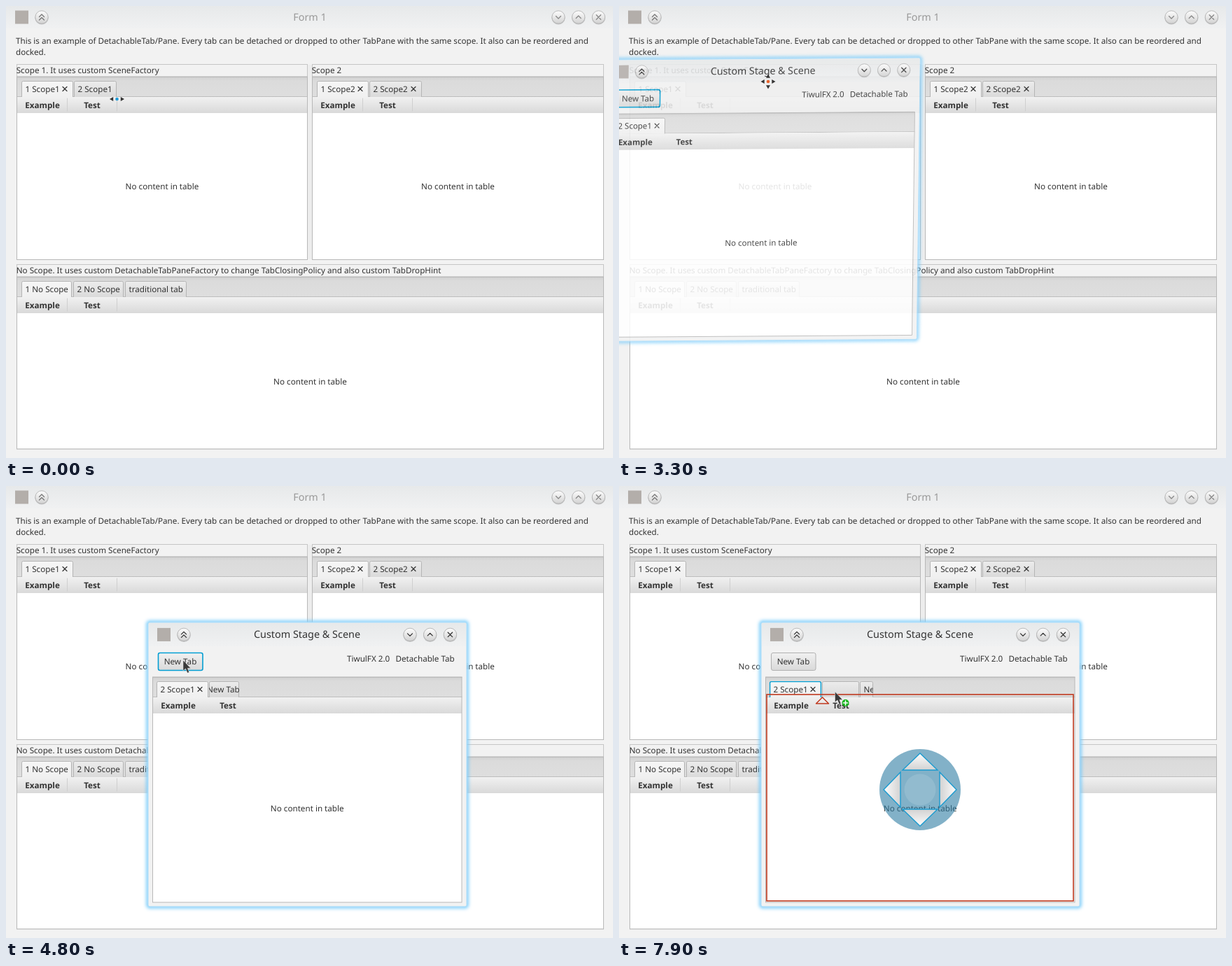
An HTML page for the animation above (8 s loop, 867 by 646 pixels).

```html
<!DOCTYPE html>
<html lang="en">
<head>
<meta charset="utf-8">
<title>Detachable tabs</title>
<style>
html, body { margin: 0; width: 100%; height: 100%; overflow: hidden; background: #f2f2f2; }
svg { display: block; }
text {
  font: 11.67px "Noto Sans", sans-serif;
  fill: #333;
  text-rendering: geometricPrecision;
  white-space: pre;
}
.mid { text-anchor: middle; }
.bold { font-weight: 700; }
.title { font-size: 14.4px; text-anchor: middle; }
.tiny { font-size: 5.8px; fill: #666; }
.line { fill: none; stroke-linecap: round; stroke-linejoin: round; }
</style>
</head>
<body>
<svg id="stage" width="867" height="646" viewBox="0 0 867 646">
  <defs>
    <linearGradient id="bar" x2="0" y2="1"><stop stop-color="#e7e9ea"/><stop offset="1" stop-color="#f0f1f2"/></linearGradient>
    <linearGradient id="strip" x2="0" y2="1"><stop stop-color="#d0d0d0"/><stop offset=".2" stop-color="#dbdbdb"/><stop offset="1" stop-color="#dedede"/></linearGradient>
    <linearGradient id="head" x2="0" y2="1"><stop stop-color="#f1f1f1"/><stop offset="1" stop-color="#d9d9d9"/></linearGradient>
    <linearGradient id="tab" x2="0" y2="1"><stop stop-color="#ececec"/><stop offset="1" stop-color="#dadada"/></linearGradient>
    <linearGradient id="tabOn" x2="0" y2="1"><stop stop-color="#f6f6f6"/><stop offset="1" stop-color="#f0f0f0"/></linearGradient>
    <linearGradient id="knob" x2="0" y2="1"><stop stop-color="#fdfdfd"/><stop offset="1" stop-color="#d2d2d2"/></linearGradient>
    <filter id="blur" x="-10%" y="-10%" width="120%" height="120%"><feGaussianBlur stdDeviation="2.6"/></filter>
  </defs>
  <g id="view"></g>
</svg>
<script>
const LOOP = 8000, BLUE = '#039ed3', RED = '#c03a20';
const EMPTY = 'No content in table';

const text = (x, y, s, cls = '', extra = '') => `<text x="${x}" y="${y}" class="${cls}" ${extra}>${s}</text>`;
const rect = (x, y, w, h, fill, extra = '') => `<rect x="${x}" y="${y}" width="${w}" height="${h}" fill="${fill}" ${extra}/>`;
const path = (d, stroke, w = 1, extra = '') => `<path class="line" d="${d}" stroke="${stroke}" stroke-width="${w}" ${extra}/>`;
const at = (x, y, s) => `<g transform="translate(${x} ${y})">${s}</g>`;
const cross = (x, y, r, color, w) => path(`M${x - r} ${y - r}l${2 * r} ${2 * r}m0 ${-2 * r}l${-2 * r} ${2 * r}`, color, w);

const GLYPHS = {
  roll: 'M-3.5 -.5L0 -4L3.5 -.5M-3.5 4L0 .5L3.5 4',
  down: 'M-3.5 -1.5L0 2L3.5 -1.5',
  up: 'M-3.5 1.5L0 -2L3.5 1.5',
  close: 'M-3.2 -3.2L3.2 3.2M3.2 -3.2L-3.2 3.2'
};

function knob(x, y, glyph, color) {
  return at(x, y,
    '<circle cy="1" r="9.6" fill="#000" opacity=".17"/>' +
    '<circle r="9.2" fill="url(#knob)" stroke="#acacac" stroke-width=".8"/>' +
    path(GLYPHS[glyph], color, 1.3));
}

function titleBar(iconX, y, mid, title, right, active) {
  const color = active ? '#333' : '#999';
  return rect(iconX, y - 9.5, 19, 19, '#b3aeaa') +
    knob(iconX + 38, y, 'roll', active ? '#333' : '#777') +
    text(mid, y + 5, title, 'title', `style="fill:${color}"`) +
    ['down', 'up', 'close'].map((g, i) => knob(right + i * 28.7, y, g, active ? '#333' : '#888')).join('');
}

// flags: s selected, x closable, f focused, h hovered
function tab(y, [x, w, label, flags, shift = 5.5]) {
  const has = f => flags.includes(f);
  const shape = (i, h) => `M${x + i} ${y + h}V${y + i + 2}q0 -2 2 -2H${x + w - i - 2}q2 0 2 2V${y + h}`;
  let out = `<path d="${shape(.5, 23)}" fill="url(#${has('s') || has('h') ? 'tabOn' : 'tab'})" stroke="#b4b4b4"/>`;
  if (has('f')) out += path(shape(.6, 22.5), BLUE, 1.4);
  out += `<svg x="${x}" y="${y}" width="${w}" height="23">${text(shift, 15.7, label)}</svg>`;
  if (has('x')) out += cross(x + w - 12, y + 11.5, 3, '#333', 1.2);
  return out;
}

function tableHead(x, y, w, lines) {
  return rect(x, y, w, 23, 'url(#head)') +
    text(x + 36.5, y + 16.2, 'Example', 'mid bold') +
    text(x + 107.5, y + 16.2, 'Test', 'mid bold') +
    (lines ? path(`M${x + 72} ${y + 2}v18m71 -18v18`, '#cfcfcf') : '');
}

function tabPane(x, y, w, h, tabs, page, lines) {
  const top = y + 29;
  const body = page ?
    rect(x, top, w, h - 29, '#f3f3f3') + text(x + .5, top + 13, page) :
    rect(x, top, w, h - 29, '#fff') + tableHead(x, top, w, lines) +
      text(x + w / 2, (top + 23 + y + h) / 2 + 4.5, EMPTY, 'mid');
  return rect(x, y, w, 29, 'url(#strip)') +
    path(`M${x} ${y + .5}h${w}M${x} ${top - .5}h${w}`, '#bdbdbd') +
    body + rect(x, y, w, h, 'none', 'stroke="#b8b8b8"') +
    tabs.map(t => tab(top - 23, t)).join('');
}

function group(x, y, w, h, label, tabs) {
  return rect(x, y, w, h, '#f2f2f2', 'stroke="#c6c6c6"') +
    text(x - .8, y + 12.6, label) +
    tabPane(x, y + 17.5, w, h - 17.5, tabs, '', true);
}

function mainWindow(s) {
  return rect(0, 0, 867, 646, '#f2f2f2') + rect(0, 0, 867, 32, 'url(#bar)') +
    titleBar(13, 16, 434, 'Form 1', 789, s.active) +
    text(14, 54, 'This is an example of DetachableTab/Pane. Every tab can be detached or dropped to other TabPane with the same scope. It also can be reordered and') +
    text(14, 70, 'docked.') +
    rect(431, 84, 6, 278, '#ededed') +
    group(15.5, 83.5, 415, 279, 'Scope 1. It uses custom SceneFactory', s.left) +
    group(437.5, 83.5, 416, 279, 'Scope 2', [[444, 74, '1 Scope2', 'sx'], [519, 75, '2 Scope2', 'x']]) +
    group(15.5, 369.5, 838, 263.5, 'No Scope. It uses custom DetachableTabPaneFactory to change TabClosingPolicy and also custom TabDropHint',
      [[22, 72, '1 No Scope', 's'], [96, 72, '2 No Scope', ''], [170, 88, 'traditional tab', '']]);
}

function dock(x) {
  const arrow = [0, 90, 180, 270].map(a =>
    `<path d="M0 -52L25 -28H-25Z" transform="rotate(${a})" fill="url(#knob)" stroke="#1a9bd0" stroke-width="1.4"/>`).join('');
  return rect(211, 298, 438, 295, 'none', `stroke="${RED}" stroke-width="1.6"`) +
    path(`M${x} 302l9 9h-18z`, RED, 1.5) +
    at(430, 434, '<circle r="58" fill="#2f7da3" opacity=".6"/>' + arrow +
      '<circle r="22.5" fill="#fff" opacity=".13"/>');
}

function childWindow(s) {
  const frame = 'x="203" y="195" width="455" height="406" rx="2"';
  const button = s.button === 'pressed' ? '#d4d4d4' : 'url(#head)';
  const edge = s.button ? `stroke="${BLUE}" stroke-width="1.6"` : 'stroke="#b0b0b0"';
  return `<g transform="${s.move}" opacity="${s.fade}">
    <rect ${frame} fill="#fff" stroke="#6cc8fa" stroke-width="5" filter="url(#blur)"/>
    <rect ${frame} fill="#f2f2f2" stroke="#a9dcf8"/>` +
    rect(204, 196, 453, 33, 'url(#bar)') +
    titleBar(216, 212.4, 430, 'Custom Stage &amp; Scene', 577, true) +
    rect(217.5, 238.5, 63.5, 25, button, `rx="2.5" ${edge}`) +
    text(249, 255.3, 'New Tab', 'mid') +
    text(487, 251, 'TiwulFX 2.0') + text(556.5, 251, 'Detachable Tab') +
    tabPane(209.5, 273, 441.5, 322, s.tabs, s.page) +
    (s.dock ? dock(s.dock) : '') + '</g>';
}

const spikes = angles => angles.map(a => `<path d="M0 -10.5L3 -5.3H-3Z" transform="rotate(${a})" fill="#333"/>`).join('');
const dot = color => `<circle r="2.3" fill="${color}"/>`;
const CURSORS = {
  cols: spikes([90, 270]) + dot('#1d9bd8'),
  rows: spikes([0, 180]) + dot('#1d9bd8'),
  move: spikes([0, 90, 180, 270]) + dot('#e8622a'),
  arrow: '<path d="M0 0V15L3.5 12L6.2 18.2L8.6 17.2L6.4 11.4H10.8Z" fill="#3a3a3a" stroke="#eee" stroke-width=".5"/>'
};
const PLUS = '<circle cx="15" cy="16" r="5" fill="#12b51a"/>' + path('M12 16h6m-3 -3v6', '#fff', 1.6);

function cursor([kind, x, y, drag, plus]) {
  const chip = drag ? rect(11.5, .5, 40, 12, '#eee', 'stroke="#bbc6cc" opacity=".85"') +
    text(14, 8.6, drag + ' ×', 'tiny') : '';
  return at(x, y, chip + CURSORS[kind] + (plus ? PLUS : ''));
}

const scope1 = flags => ['2 Scope1', flags];
const one = f => [22, 74, '1 Scope1', f];
const pick = [215, 74, ...scope1('sx')], rest = [215, 61, ...scope1('')];
const new1 = [290, 69, 'New Tab 1', ''];
const shift = (x, y) => `translate(${x} ${y})`;
const drag = (x, y) => ['arrow', x, y, '2 Scope1'];

// each step changes only what it names
const STEPS = [
  [0, { cursor: ['cols', 158.5, 133], active: false, fade: 0, page: '', dock: 0, button: 'focus', tabs: [pick],
        left: [one('sx'), [97, 61, ...scope1('')]] }],
  [700, { cursor: ['arrow', 150, 125], left: [one('sx'), [97, 61, ...scope1('h')]] }],
  [800, { cursor: ['arrow', 144, 125] }],
  [900, { cursor: ['arrow', 140, 125] }],
  [1100, { cursor: ['arrow', 137, 122] }],
  [1200, { cursor: ['arrow', 134, 120] }],
  [1300, { cursor: ['arrow', 132, 119] }],
  [1700, { active: true, left: [[22, 61, '1 Scope1', ''], [84, 74, ...scope1('sxf')]] }],
  [1800, { cursor: drag(134, 113), left: [one('sxf')] }],
  [1900, { cursor: drag(138, 102) }],
  [2000, { cursor: drag(143, 88) }],
  [2100, { cursor: drag(147, 76) }],
  [2200, { cursor: drag(149, 69) }],
  [2400, { cursor: ['rows', 150.5, 72] }],
  [2600, { cursor: ['arrow', 150, 72], active: false, fade: .6, move: shift(-230, -116), left: [one('sx')] }],
  [3100, { cursor: ['arrow', 172, 94], fade: 1, move: shift(-230, -118) }],
  [3300, { cursor: ['move', 213, 108], fade: .87, move: 'matrix(.984 -.0066 -.012 .991 -214.9 -114.9)' }],
  [3400, { cursor: ['move', 285, 146], move: shift(-160, -82) }],
  [3500, { cursor: ['move', 345, 179], move: shift(-86, -48) }],
  [3600, { cursor: ['move', 384, 200], move: shift(-31, -24) }],
  [3800, { cursor: ['move', 402, 210], move: shift(-8, -6) }],
  [3900, { cursor: ['move', 404, 212], move: shift(1.5, 1.5) }],
  [4000, { move: shift(2, 1.5) }],
  [4200, { cursor: ['arrow', 330, 235], fade: .95, move: shift(1, .5) }],
  [4300, { cursor: ['arrow', 277, 251], fade: 1, move: shift(0, 0) }],
  [4500, { cursor: ['arrow', 253, 249] }],
  [4700, { button: 'pressed' }],
  [4800, { button: 'focus', tabs: [pick, [290, 43, 'New Tab 1', '', -3]] }],
  [5000, { tabs: [pick, new1] }],
  [5300, { button: 'pressed', tabs: [pick, new1, [360, 35, 'New Tab 2', '', -6]] }],
  [5400, { button: 'focus', tabs: [pick, new1, [360, 70, 'New Tab 2', '']] }],
  [5600, { cursor: ['arrow', 334, 276] }],
  [5800, { cursor: ['arrow', 370, 285] }],
  [5900, { cursor: ['arrow', 400, 290] }],
  [6300, { button: '', page: 'Content New Tab 2',
           tabs: [rest, [277, 69, 'New Tab 1', ''], [347, 83, 'New Tab 2', 'sxf']] }],
  [6700, { cursor: ['arrow', 328, 309, 'New Tab 2', true], page: 'Content New Tab 1', dock: 277,
           tabs: [rest, [277, 82, 'New Tab 1', 'sxf']] }],
  [6900, { cursor: ['arrow', 328, 309] }],
  [7100, { page: 'Content New Tab 2', dock: 0,
           tabs: [rest, [277, 40, 'New Tab 2', 's', -4], [318, 69, 'New Tab 1', '']] }],
  [7400, { tabs: [rest, [277, 82, 'New Tab 2', 'sx'], [360, 70, 'New Tab 1', '']] }],
  [7700, { cursor: ['arrow', 316, 290] }],
  [7900, { cursor: ['arrow', 308.5, 294, '', true], page: '', dock: 290.5,
           tabs: [[215, 74, ...scope1('sxf')], [290, 53, '', ''], [344, 19, 'New Tab 1', '']] }]
];

let last = {};
const states = STEPS.map(([time, change]) => [time, last = { ...last, ...change }]);
const view = document.getElementById('view');
let shown = null;

function draw(now) {
  const t = now % LOOP;
  const state = states.filter(([time]) => time <= t).pop()[1];
  if (state !== shown) {
    shown = state;
    view.innerHTML = mainWindow(state) + (state.fade ? childWindow(state) : '') + cursor(state.cursor);
  }
}

const start = performance.now();
function tick() {
  draw(performance.now() - start);
  requestAnimationFrame(tick);
}
tick();
</script>
</body>
</html>
```
